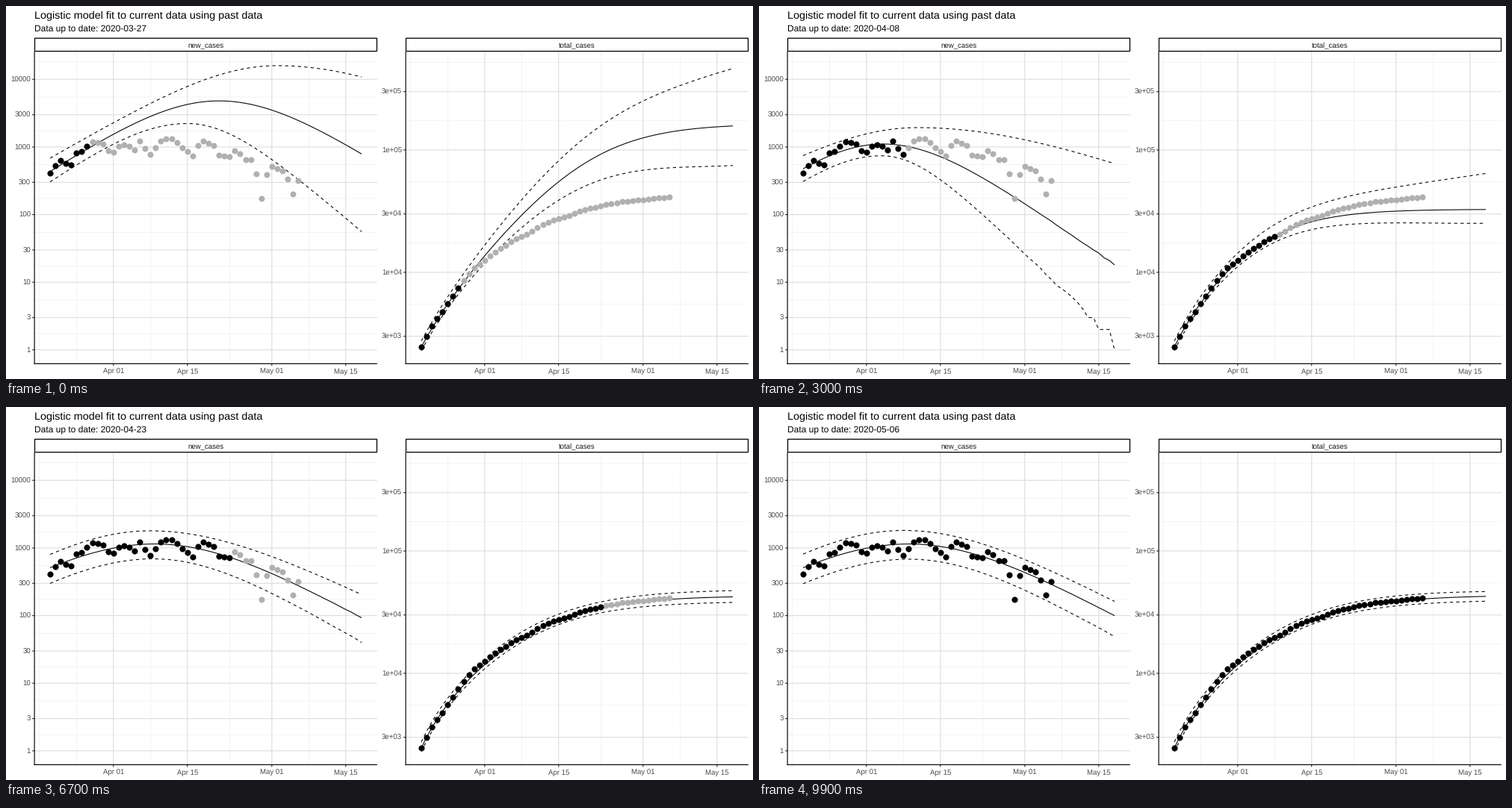
These frames come from a looping animation (1000 px wide and 500 px high, 10000 ms). A matplotlib script:

```python
import numpy as np
import matplotlib.pyplot as plt
from matplotlib.animation import FuncAnimation
from matplotlib.patches import Rectangle

plt.rcParams["font.family"] = "Liberation Sans"
plt.rcParams["text.hinting"] = "none"

W, H, DPI = 1000, 500, 100
PX = 72 / DPI                      # points per pixel
FRAMES, STATES = 100, 41
TOP, BOTTOM, WIDTH = 61, 479.5, 458.8
SHIFT = 497                        # offset of the right panel
DAY_X, DAY_W = 59.0, 417 / 59
FIRST_FIT = np.datetime64("2020-03-27")
FIRST_TOTAL = 2456

# Observed daily counts.
new_cases = np.array([
    411, 529, 632, 571, 543, 815, 847, 1025, 1180, 1165, 1105, 880,
    842, 1025, 1078, 1025, 902, 1224, 949, 775, 974, 1210, 1330, 1310,
    1170, 974, 864, 736, 1058, 1230, 1134, 1058, 755, 736, 715, 885,
    800, 652, 652, 400, 173, 388, 516, 478, 446, 337, 201, 318])
total_cases = FIRST_TOTAL + np.cumsum(new_cases) - new_cases[0]

# Logistic waves (peak count, peak day, growth rate, decay rate)
# for median, upper and lower bound, then the spread of the final total.
FITS = {
    0: ((4800, 32, .117, .115), (15930, 43, .105, .080),
        (2222, 26, .127, .153), (77, 53)),
    5: ((1932, 27, .101, .101), (4143, 37, .085, .084),
        (765, 13, .165, .212), (46, 92)),
    8: ((1065, 12, .168, .147), (2222, 26, .090, .074),
        (755, 13, .161, .230), (78, 22)),
    16: ((1149, 19, .101, .106), (1681, 18, .106, .058),
         (728, 17, .114, .131), (30, 15.5)),
    40: ((1145, 20, .096, .097), (1817, 19, .101, .094),
         (683, 20, .098, .102), (6.5, 6.5)),
}
KEYS = list(FITS)
days = np.arange(60)


def new_y(v):
    return 460.9 - 90.65 * np.log10(v)


def total_y(v):
    return 357.0 - 164.0 * (np.log10(v) - 4)


def fit_at(state):
    """Waves and spread of one state, blended between the key fits."""
    i = min(np.searchsorted(KEYS, state, "right") - 1, len(KEYS) - 2)
    a, b = KEYS[i], KEYS[i + 1]
    u = (state - a) / (b - a)
    if b == KEYS[-1]:
        u = 1 - (1 - u) ** 3       # the last fits settle quickly
    return [np.power(p, 1.0 - u) * np.power(q, u)
            for p, q in zip(FITS[a], FITS[b])]


def wave(peak, day, rise, fall):
    z = np.where(days < day, rise, fall) * (days - day) / 2
    return peak / np.cosh(z) ** 2


def new_curves(state):
    """Whole daily counts; zero lies on the panel's floor."""
    for params in fit_at(state)[:3]:
        count = np.round(wave(*params))
        yield np.where(count > 0, new_y(np.maximum(count, 1)), BOTTOM)


def total_curves(state):
    """Summed median wave with bounds that widen over time."""
    median, _, _, (up, down) = fit_at(state)
    new = wave(*median)
    y = total_y(FIRST_TOTAL + np.cumsum(new) - new[0])
    s = days / days[-1]
    return (y, y - 8 - (up - 8) * s ** 1.5,
            y + 5 + (down - 5) * s * s * (3 - 2 * s))


fig = plt.figure(figsize=(W / DPI, H / DPI), dpi=DPI, facecolor="white")
ax = fig.add_axes([0, 0, 1, 1])
ax.set_xlim(0, W)
ax.set_ylim(H, 0)
ax.axis("off")


def line(x, y, color="black", width=1.16, z=1, **kw):
    return ax.plot(x, y, color=color, lw=width * PX, zorder=z, snap=False,
                   solid_capstyle="butt", dash_capstyle="butt", **kw)[0]


def text(x, y, s, size=9.6, color="#4d4d4d", ha="center"):
    return ax.text(x, y, s, fontsize=size * PX, color=color, ha=ha,
                   va="baseline")


def dots(x, y, color, z):
    return ax.plot(x, y, "o", color=color, ms=8 * PX, mew=0, zorder=z)[0]


def day_x(day, shift):
    return DAY_X + shift + DAY_W * np.asarray(day)


class Panel:
    def __init__(self, shift, name, scale, ticks, data, curves):
        self.curves = curves
        left, right = 38.1 + shift, 38.1 + shift + WIDTH
        area = Rectangle((left, TOP), WIDTH, BOTTOM - TOP,
                         transform=ax.transData)
        xs = day_x([12, 26, 42, 56], shift)
        ys = np.array([scale(float(t)) for t in ticks])

        # grid
        step = xs[1] - xs[0]
        minor_x = [xs[0] - step, xs[0] - step / 2, *(xs[1:] + xs[:-1]) / 2]
        minor_y = [*(ys[1:] + ys[:-1]) / 2, ys[-1] - (ys[-2] - ys[-1]) / 2]
        for pos_x, pos_y, width, z in ((minor_x, minor_y, 0.35, 0.5),
                                       (xs, ys, 1.16, 1)):
            for x in pos_x:
                line([x, x], [TOP, BOTTOM], "#dedede", width, z)
            for y in pos_y:
                line([left, right], [y, y], "#dedede", width, z)

        # axes, ticks and strip
        line([left, left], [TOP, BOTTOM + 0.6], z=6)
        line([left - 0.6, right], [BOTTOM, BOTTOM], z=6)
        for x, label in zip(xs, ("Apr 01", "Apr 15", "May 01", "May 15")):
            line([x, x], [BOTTOM, BOTTOM + 3], "#333333")
            text(x, 493.2, label)
        for y, label in zip(ys, ticks):
            line([left - 3, left], [y, y], "#333333")
            text(left - 5.2, y + 3.5, label, ha="right")
        ax.add_patch(Rectangle((left + 0.4, 43.2), WIDTH - 0.8, 17.4,
                               fc="white", ec="black", lw=1.3 * PX,
                               zorder=7, snap=False))
        text((left + right) / 2, 55.6, name, color="#1a1a1a").set_zorder(8)

        # fitted curves and data
        self.lines = [line(day_x(days, shift), days, width=1.07, z=3,
                           dashes=d) for d in ((None, None), (4, 4), (4, 4))]
        for ln in self.lines:
            ln.set_clip_path(area)
        self.px, self.py = day_x(np.arange(len(data)), shift), scale(data)
        dots(self.px, self.py, "#b0b0b0", 4)
        self.seen = dots([], [], "black", 5)

    def show(self, state):
        for ln, y in zip(self.lines, self.curves(state)):
            ln.set_ydata(y)
        n = state + 8
        self.seen.set_data(self.px[:n], self.py[:n])


panels = [
    Panel(0, "new_cases", new_y,
          ["1", "3", "10", "30", "100", "300", "1000", "3000", "10000"],
          new_cases, new_curves),
    Panel(SHIFT, "total_cases", total_y,
          ["3e+03", "1e+04", "3e+04", "1e+05", "3e+05"],
          total_cases, total_curves),
]
text(38, 17.2, "Logistic model fit to current data using past data", 14.4,
     "black", "left")
subtitle = text(38, 34.2, "", 12, "black", "left")

# Each day's fit appears on the nearest frame; the date label rounds down.
starts = np.round(np.arange(STATES) * (FRAMES - 1) / (STATES - 1))


def update(frame):
    state = int(np.searchsorted(starts, frame, "right")) - 1
    for panel in panels:
        panel.show(state)
    date = FIRST_FIT + frame * (STATES - 1) // (FRAMES - 1)
    subtitle.set_text(f"Data up to date: {date}")
    return []


anim = FuncAnimation(fig, update, frames=FRAMES, interval=100,
                     init_func=lambda: update(0), repeat=True,
                     repeat_delay=0, blit=False)
plt.show()
```
